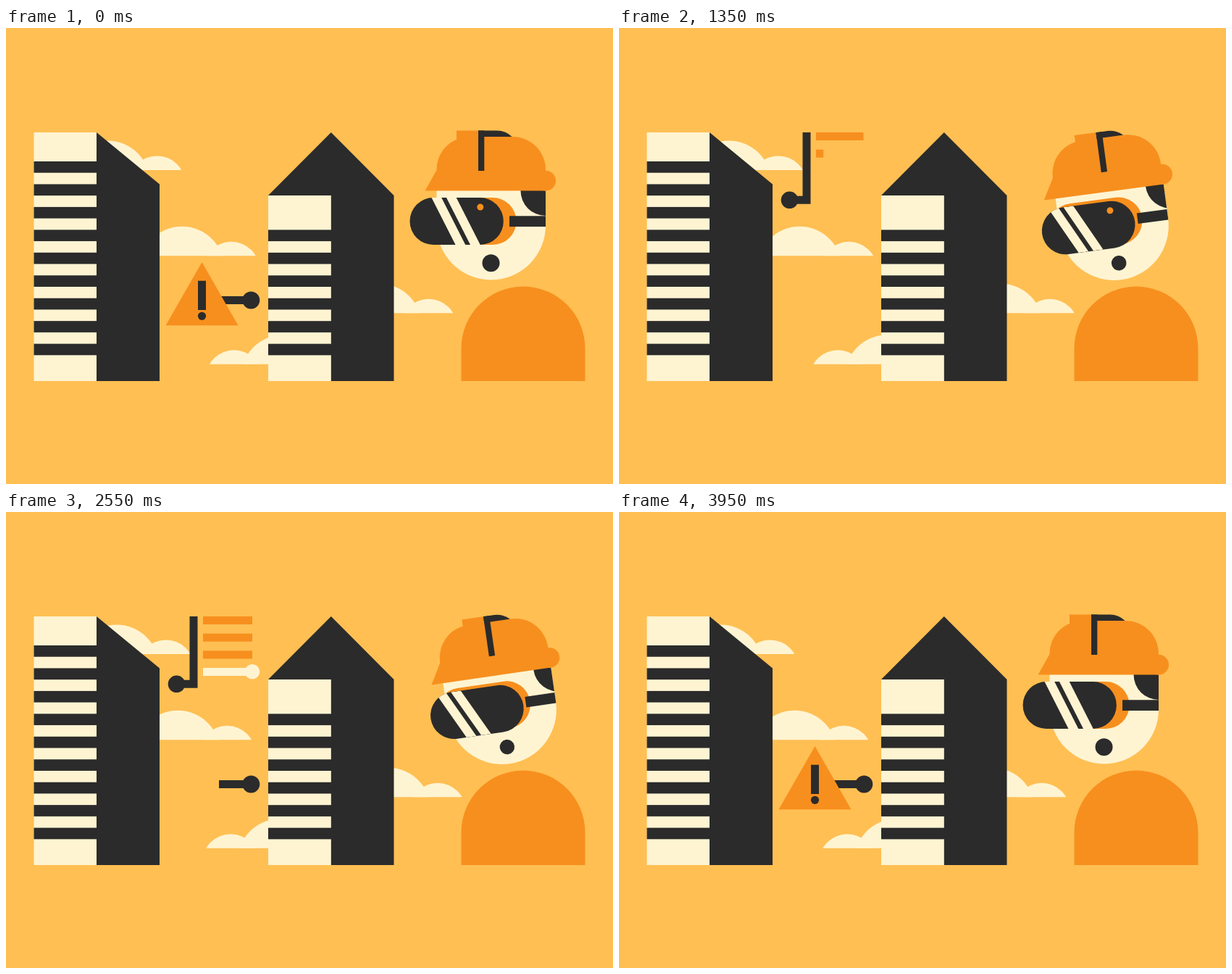
These frames come from a looping animation (838 px wide and 629 px high, 4000 ms). An HTML page with a canvas:

```html
<!DOCTYPE html>
<html lang="en">
<head>
<meta charset="utf-8">
<title>Site inspection</title>
<style>
  html, body { margin: 0; width: 100%; height: 100%; overflow: hidden; background: #ffbf53; }
  canvas { display: block; width: 838px; height: 629px; }
</style>
</head>
<body>
<canvas id="stage"></canvas>
<script>
const W = 838, H = 629, LOOP = 4000;
const SKY = '#ffbf53', CREAM = '#fff4d2', DARK = '#2b2b2b', ORANGE = '#f78f1e';
const canvas = document.getElementById('stage');
const ctx = canvas.getContext('2d');
const dpr = window.devicePixelRatio || 1;
canvas.width = Math.round(W * dpr);
canvas.height = Math.round(H * dpr);

// Timing helpers
const clamp = p => Math.min(1, Math.max(0, p));
const sine = p => (1 - Math.cos(Math.PI * clamp(p))) / 2;
const back = p => {
  const u = clamp(p) - 1;
  return 1 + 2.2 * u ** 3 + 1.2 * u ** 2;
};
const ramp = (t, start, len = 400) => sine((t - start) / len);
const wave = t => Math.sin(2 * Math.PI * t / LOOP);

// Drawing helpers
function rect(color, x1, y1, x2, y2) {
  if (x2 <= x1 || y2 <= y1) return;
  ctx.fillStyle = color;
  ctx.fillRect(x1, y1, x2 - x1, y2 - y1);
}

function circle(color, x, y, r) {
  if (r <= 0) return;
  ctx.fillStyle = color;
  ctx.beginPath();
  ctx.arc(x, y, r, 0, 2 * Math.PI);
  ctx.fill();
}

function poly(color, ...pts) {
  ctx.fillStyle = color;
  ctx.beginPath();
  pts.forEach(([x, y]) => ctx.lineTo(x, y));
  ctx.closePath();
  ctx.fill();
}

// Strokes the first part of a polyline
function trace(part, ...pts) {
  if (part <= 0) return;
  let len = 0;
  ctx.beginPath();
  pts.forEach(([x, y], i) => {
    ctx.lineTo(x, y);
    if (i) len += Math.hypot(x - pts[i - 1][0], y - pts[i - 1][1]);
  });
  ctx.setLineDash([len * part, len * 2]);
  ctx.strokeStyle = DARK;
  ctx.lineWidth = 11;
  ctx.stroke();
  ctx.setLineDash([]);
}

function clipped(path, draw) {
  ctx.save();
  ctx.clip(path);
  draw();
  ctx.restore();
}

const shape = build => {
  const p = new Path2D();
  build(p);
  p.closePath();
  return p;
};

function fill(color, path) {
  ctx.fillStyle = color;
  ctx.fill(path);
}

const pill = shape(p => {
  p.arc(590, 266.5, 32.5, Math.PI / 2, Math.PI * 1.5);
  p.arc(654.3, 266.5, 32.5, -Math.PI / 2, Math.PI / 2);
});
const face = shape(p => {
  p.moveTo(594.5, 222);
  p.lineTo(745, 222);
  p.arc(669.75, 272.3, 75.25, 0, Math.PI);
});
const helmet = shape(p => {
  p.moveTo(578.5, 224.5);
  p.lineTo(594.5, 196);
  p.arc(640, 195.5, 45.5, Math.PI, Math.PI * 1.5);
  p.arc(699.5, 195.5, 45.5, -Math.PI / 2, 0);
  p.lineTo(745, 224.5);
});
const torso = shape(p => {
  p.arc(714, 442, 85.5, Math.PI, 0);
  p.lineTo(799.5, 487);
  p.lineTo(628.5, 487);
});

// Cloud tip at (x, y); dir 1 points right, -1 left
function cloud(x, y, dir) {
  ctx.save();
  ctx.beginPath();
  ctx.rect(0, 0, W, y);
  ctx.clip();
  circle(CREAM, x - dir * 34, y + 19.3, 38.9);
  circle(CREAM, x - dir * 102, y + 18, 58.5);
  ctx.restore();
}

function floors(x1, x2, top, count) {
  for (let i = 0; i < count; i++) {
    const y = top + i * 31.45;
    rect(DARK, x1, y, x2, y + 15.7);
  }
}

function buildings() {
  rect(CREAM, 38.5, 144, 125.5, 487);
  poly(DARK, [125, 144], [212, 215.5], [212, 487], [125, 487]);
  floors(38.5, 125.5, 184, 9);
  rect(CREAM, 362, 231, 449, 487);
  poly(DARK, [362, 231], [448.8, 144], [535.5, 231], [535.5, 487], [448.8, 487], [448.8, 231]);
  floors(362, 449, 278.4, 6);
}

function chart(t) {
  const stem = ramp(t, 480) - ramp(t, 3250);
  trace(stem, [235.5, 237.3], [259, 237.3], [259, 144]);
  circle(DARK, 235.5, 237.3, 11.8 * (ramp(t, 250, 250) - ramp(t, 3550, 250)));

  for (let i = 0; i < 3; i++) {
    const grow = ramp(t, 1000 + 250 * i) - ramp(t, 3125 - 125 * i);
    const y = 144 + 23.7 * i;
    rect(ORANGE, 272, y, 272 + 68 * grow, y + 11);
  }

  const x = 272 + 68 * (ramp(t, 1700) - ramp(t, 2750));
  rect(CREAM, 272, 215, x, 226);
  circle(CREAM, x, 220.3, 10.3 * (ramp(t, 1500, 220) - ramp(t, 3080, 220)));
}

function warning(t) {
  const arm = t < 1500 ? 1 - ramp(t, 350, 350) : ramp(t, 2125);
  const dot = t < 1500 ? 1 - ramp(t, 770, 230) : ramp(t, 1920, 250);
  const size = t < 1500 ? back(1 - (t - 50) / 400) : back((t - 2650) / 550);
  trace(arm, [338.3, 375.5], [294, 375.5]);
  circle(DARK, 338.3, 375.5, 12 * dot);
  if (size <= 0) return;
  ctx.save();
  ctx.translate(270.5, 367);
  ctx.scale(size, size);
  poly(ORANGE, [0, -44], [50, 43.2], [-50, 43.2]);
  rect(DARK, -5.5, -18.3, 5.5, 22);
  circle(DARK, 0, 30.3, 5.6);
  ctx.restore();
}

function goggles(t, turn) {
  ctx.save();
  ctx.translate(17.7 + 6.5 * turn, 0);
  fill(ORANGE, pill);
  ctx.restore();

  rect(DARK, 695 + 10.5 * turn, 259.3, 745, 274);

  ctx.save();
  ctx.translate(16 * turn, 5 * turn);
  fill(DARK, pill);
  clipped(pill, () => {
    const slide = -21.5 * turn;
    for (const x of [587.5, 608]) {
      const a = x + slide;
      poly(CREAM, [a, 234], [a + 13.7, 234], [a + 46.7, 299], [a + 33, 299]);
    }
  });
  if (t % 1000 < 500) circle(ORANGE, 654.8, 247, 4.5);
  ctx.restore();
}

function hat(turn) {
  const x = 652 + 13 * turn;
  rect(ORANGE, x - 30, 141.5, x + 1, 180);
  ctx.fillStyle = DARK;
  ctx.beginPath();
  ctx.moveTo(x, 141.5);
  ctx.arc(678, 171, 29.5, -Math.PI / 2, 0);
  ctx.lineTo(x, 171);
  ctx.fill();
  fill(ORANGE, helmet);
  circle(ORANGE, 745, 210.7, 14);
  rect(DARK, x, 141.5, x + 8.3, 197);
}

function worker(t, turn) {
  fill(ORANGE, torso);
  ctx.save();
  ctx.translate(680, 169);
  ctx.rotate(-turn * Math.PI / 18);
  ctx.translate(-680, -169);
  fill(CREAM, face);
  clipped(face, () => circle(DARK, 745 + 12.5 * turn, 224.5, 34.5));
  circle(DARK, 669.5, 324.2, 12 - 2.2 * turn);
  goggles(t, turn);
  hat(turn);
  ctx.restore();
}

function draw(t) {
  const sway = (1 - Math.cos(2 * Math.PI * t / LOOP)) / 2;
  ctx.setTransform(dpr, 0, 0, dpr, 0, 0);
  rect(SKY, 0, 0, W, H);
  cloud(242.5 + 15 * sway, 196, 1);
  cloud(345 + 7.5 * wave(t), 314.3, 1);
  cloud(617.5 + 15 * sway, 393.3, 1);
  cloud(275.5 + 7.5 * wave(t + 1500), 463.8, -1);
  buildings();
  chart(t);
  warning(t);
  worker(t, sway);
}

const begin = performance.now();
function tick() {
  draw((performance.now() - begin) % LOOP);
  requestAnimationFrame(tick);
}
tick();
</script>
</body>
</html>
```
